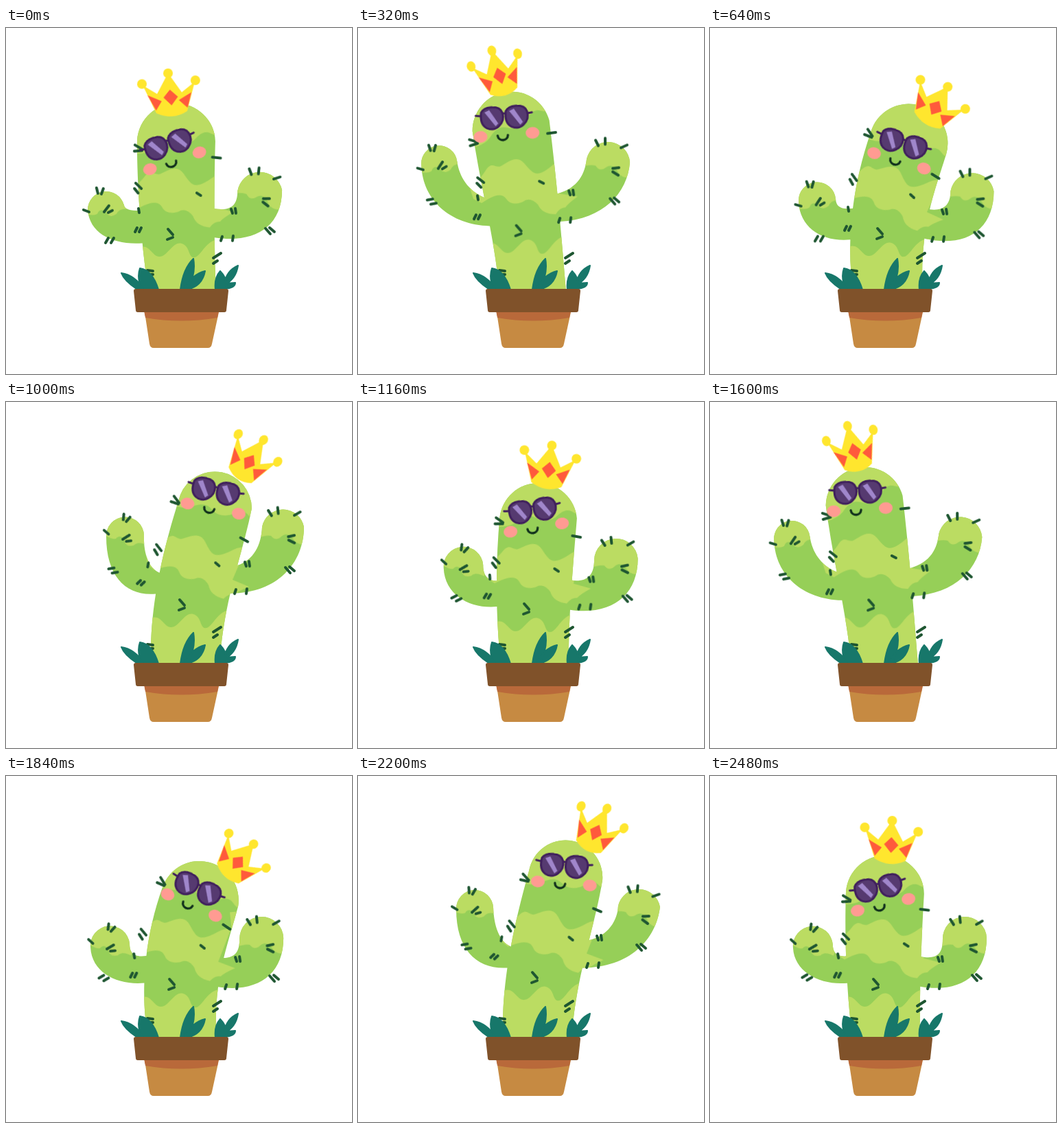
Recreate the animation shown at these times as an HTML page without scripts. Size 504 px wide and 504 px high, loop 2.52 s.

```html
<!DOCTYPE html>
<html lang="en">
<head>
<meta charset="utf-8">
<title>Dancing cactus</title>
<style>
html, body { margin: 0; width: 100%; height: 100%; overflow: hidden; background: #fff; }
svg { display: block; width: 100%; height: 100%; }
.move { animation: 1260ms linear infinite; }
.body { animation-name: body; }
.armL { animation-name: armL; }
.armR { animation-name: armR; }
.face { animation-name: face; }
.head { animation-name: head; }
.crown { animation-name: crown; }
.chest { animation-name: chest; }
.belly { animation-name: belly; }
.handL { animation-name: handL; }
.elbowL { animation-name: elbowL; }
.shoulderL { animation-name: shoulderL; }
.handR { animation-name: handR; }
.elbowR { animation-name: elbowR; }
.shoulderR { animation-name: shoulderR; }
.light { fill: #bbdc62; }
.spikes { fill: none; stroke: #1e5631; stroke-width: 4; stroke-linecap: round; }

/* Outlines */
@keyframes body {
  0%, 100% { d: path("M208 385C197 320 191 230 191 169A57 57 0 0 1 305 165C303 230 303 320 306 385Z"); }
  7.94% { d: path("M208 385C200 320 187 235 182 163A57 57 0 0 1 296 157C300 230 299 310 305 385Z"); animation-timing-function: ease-out; }
  23.81% { d: path("M206 385C200 310 178 230 166 150A57 57 0 0 1 278 134C290 230 296 300 303 385Z"); animation-timing-function: ease-in-out; }
  46.03% { d: path("M208 385C196 330 198 245 228 162A57 57 0 0 1 338 190C324 244 300 300 307 385Z"); }
  50.79% { d: path("M209 385C198 320 205 235 234 152A57 57 0 0 1 344 184C329 233 304 292 310 385Z"); animation-timing-function: ease-out; }
  63.49% { d: path("M210 385C207 310 220 240 246 142A54 54 0 0 1 353 157C342 230 316 290 310 385Z"); }
  74.6% { d: path("M211 385C209 310 221 238 249 138A54 54 0 0 1 356 152C344 226 317 290 311 385Z"); }
  79.37% { d: path("M211 385C209 310 222 235 254 135A54 54 0 0 1 358 155C344 225 316 290 311 385Z"); animation-timing-function: ease-in-out; }
  96.83% { d: path("M208 385C199 320 196 240 198 174A57 57 0 0 1 312 172C308 240 305 310 306 385Z"); }
}
@keyframes armL {
  0%, 100% { d: path("M205 265C180 268 173 264 172 258A27 27 0 0 0 119 265C122 302 160 318 205 313Z"); }
  7.94% { d: path("M200 260C176 264 164 256 163 240A26 26 0 0 0 111 251C118 290 150 312 200 302Z"); animation-timing-function: ease-out; }
  23.81% { d: path("M205 252C168 248 148 222 144 194A26 26 0 0 0 92 200C94 254 140 292 205 288Z"); animation-timing-function: ease-in-out; }
  46.03% { d: path("M205 262C184 265 180 256 180 244A28 28 0 0 0 123 250C125 288 165 306 205 301Z"); }
  50.79% { d: path("M215 262C192 266 184 262 183 250A27 27 0 0 0 129 254C131 295 170 316 215 307Z"); animation-timing-function: ease-out; }
  63.49% { d: path("M227 250C207 246 194 225 191 203A27 27 0 0 0 138 208C139 264 176 288 225 282Z"); }
  74.6% { d: path("M228 250C207 246 198 220 197 192A27 27 0 0 0 143 194C143 256 176 284 222 279Z"); }
  79.37% { d: path("M228 250C208 246 200 220 201 194A27 27 0 0 0 146 196C146 257 178 285 222 279Z"); animation-timing-function: ease-in-out; }
  96.83% { d: path("M203 262C184 265 179 256 179 245A28 28 0 0 0 121 250C123 288 165 306 203 301Z"); }
}
@keyframes armR {
  0%, 100% { d: path("M296 262C325 268 337 262 337 238A33 33 0 0 1 402 236C402 295 355 316 296 304Z"); }
  7.94% { d: path("M292 246C330 248 345 222 356 208A34 34 0 0 1 412 244C395 275 350 292 294 288Z"); animation-timing-function: ease-out; }
  23.81% { d: path("M270 245C318 240 330 215 333 190A32 32 0 0 1 396 195C392 245 350 285 275 282Z"); animation-timing-function: ease-in-out; }
  46.03% { d: path("M302 264C328 268 340 262 340 238A32 32 0 0 1 404 236C404 292 362 318 302 306Z"); }
  50.79% { d: path("M308 262C336 270 350 262 350 238A32 32 0 0 1 413 238C413 296 370 322 308 306Z"); animation-timing-function: ease-out; }
  63.49% { d: path("M318 244C362 246 382 218 387 196A33 33 0 0 1 451 210C440 262 392 294 312 284Z"); }
  74.6% { d: path("M318 241C359 242 378 214 379 190A31 31 0 0 1 440 191C434 242 390 285 312 279Z"); }
  79.37% { d: path("M318 240C354 242 372 214 373 182A31 31 0 0 1 434 182C434 238 390 285 312 278Z"); animation-timing-function: ease-in-out; }
  96.83% { d: path("M302 262C328 268 339 262 339 238A32 32 0 0 1 403 236C403 292 362 318 302 306Z"); }
}

/* Parts carried by the outlines */
@keyframes face {
  0%, 100% { transform: translate(236px, 170px) rotate(-18deg); }
  7.94% { transform: translate(228px, 158px) rotate(-18deg); animation-timing-function: ease-out; }
  23.81% { transform: translate(212px, 130px) rotate(-4deg); animation-timing-function: ease-in-out; }
  46.03% { transform: translate(279px, 164px) rotate(25deg); }
  50.79% { transform: translate(281px, 169px) rotate(18deg); animation-timing-function: ease-out; }
  63.49% { transform: translate(299px, 138px) rotate(5deg); }
  74.6% { transform: translate(300px, 131px) rotate(5deg); }
  79.37% { transform: translate(305px, 130px) rotate(12deg); animation-timing-function: ease-in-out; }
  96.83% { transform: translate(245px, 163px) rotate(-12deg); }
}
@keyframes head {
  0%, 100% { transform: translate(250px, 183px) rotate(6deg); }
  7.94% { transform: translate(240px, 178px) rotate(1deg); animation-timing-function: ease-out; }
  23.81% { transform: translate(225px, 160px) rotate(-8deg); animation-timing-function: ease-in-out; }
  46.03% { transform: translate(274px, 188px) rotate(34deg); }
  50.79% { transform: translate(280px, 186px) rotate(32deg); animation-timing-function: ease-out; }
  63.49% { transform: translate(292px, 176px) rotate(24deg); }
  74.6% { transform: translate(296px, 173px) rotate(23deg); }
  79.37% { transform: translate(297px, 173px) rotate(29deg); animation-timing-function: ease-in-out; }
  96.83% { transform: translate(256px, 188px) rotate(7deg); }
}
@keyframes crown {
  0%, 100% { transform: translate(237px, 79px) rotate(-4deg) scale(1); }
  7.94% { transform: translate(228px, 66px) rotate(-4deg) scale(1); animation-timing-function: ease-out; }
  23.81% { transform: translate(197px, 46px) rotate(-16deg) scale(.9, 1.08); animation-timing-function: ease-in-out; }
  46.03% { transform: translate(352px, 109px) rotate(43deg) scale(.95, 1); }
  50.79% { transform: translate(339px, 97px) rotate(33deg) scale(1); animation-timing-function: ease-out; }
  63.49% { transform: translate(356px, 66px) rotate(28deg) scale(.9, 1.08); }
  74.6% { transform: translate(356px, 60px) rotate(27deg) scale(.9, 1.08); }
  79.37% { transform: translate(367px, 67px) rotate(35deg) scale(.9, 1.08); animation-timing-function: ease-in-out; }
  96.83% { transform: translate(265px, 78px) rotate(5deg) scale(1); }
}
@keyframes chest {
  0%, 100% { transform: translate(236px, 238px) rotate(6deg); }
  7.94% { transform: translate(231px, 231px) rotate(5deg); animation-timing-function: ease-out; }
  23.81% { transform: translate(222px, 225px); animation-timing-function: ease-in-out; }
  46.03% { transform: translate(242px, 240px) rotate(12deg); }
  50.79% { transform: translate(251px, 233px) rotate(16deg); animation-timing-function: ease-out; }
  63.49% { transform: translate(264px, 230px) rotate(13deg); }
  74.6% { transform: translate(266px, 228px) rotate(12deg); }
  79.37% { transform: translate(264px, 226px) rotate(14deg); animation-timing-function: ease-in-out; }
  96.83% { transform: translate(241px, 242px) rotate(6deg); }
}
@keyframes belly {
  0%, 100% { transform: translate(239px, 300px); }
  7.94% { transform: translate(236px, 296px); }
  23.81% { transform: translate(233px, 294px); }
  46.03% { transform: translate(241px, 303px); }
  50.79% { transform: translate(247px, 299px); }
  63.49% { transform: translate(255px, 294px); }
  74.6% { transform: translate(257px, 293px); }
  79.37% { transform: translate(256px, 295px); }
  96.83% { transform: translate(241px, 303px); }
}
@keyframes handL {
  0%, 100% { transform: translate(145px, 262px); }
  7.94% { transform: translate(137px, 245px) rotate(-15deg); animation-timing-function: ease-out; }
  23.81% { transform: translate(118px, 198px) rotate(-5deg); animation-timing-function: ease-in-out; }
  46.03% { transform: translate(151px, 247px) rotate(22deg); }
  50.79% { transform: translate(156px, 252px) rotate(-5deg); animation-timing-function: ease-out; }
  63.49% { transform: translate(165px, 206px) rotate(10deg); }
  74.6% { transform: translate(169px, 193px) rotate(10deg); }
  79.37% { transform: translate(174px, 195px) rotate(20deg); animation-timing-function: ease-in-out; }
  96.83% { transform: translate(149px, 247px) rotate(22deg); }
}
@keyframes elbowL {
  0%, 100% { transform: translate(150px, 310px); }
  7.94% { transform: translate(148px, 303px); animation-timing-function: ease-out; }
  23.81% { transform: translate(106px, 252px) rotate(50deg); animation-timing-function: ease-in-out; }
  46.03% { transform: translate(141px, 294px) rotate(30deg); }
  50.79% { transform: translate(158px, 308px); animation-timing-function: ease-out; }
  63.49% { transform: translate(152px, 262px) rotate(40deg); }
  74.6% { transform: translate(157px, 248px) rotate(50deg); }
  79.37% { transform: translate(155px, 245px) rotate(50deg); animation-timing-function: ease-in-out; }
  96.83% { transform: translate(140px, 293px) rotate(30deg); }
}
@keyframes shoulderL {
  0%, 100% { transform: translate(192px, 294px) rotate(0deg); }
  7.94% { transform: translate(188px, 288px) rotate(0deg); }
  23.81% { transform: translate(172px, 274px) rotate(0deg); }
  46.03% { transform: translate(185px, 290px) rotate(0deg); }
  50.79% { transform: translate(200px, 292px) rotate(0deg); }
  63.49% { transform: translate(200px, 270px) rotate(15deg); }
  74.6% { transform: translate(198px, 263px) rotate(20deg); }
  79.37% { transform: translate(196px, 263px) rotate(20deg); }
  96.83% { transform: translate(185px, 290px) rotate(0deg); }
}
@keyframes handR {
  0%, 100% { transform: translate(369px, 236px) rotate(6deg); }
  7.94% { transform: translate(384px, 224px) rotate(25deg); animation-timing-function: ease-out; }
  23.81% { transform: translate(364px, 192px); animation-timing-function: ease-in-out; }
  46.03% { transform: translate(372px, 236px) rotate(-6deg); }
  50.79% { transform: translate(382px, 238px); animation-timing-function: ease-out; }
  63.49% { transform: translate(418px, 205px) rotate(10deg); }
  74.6% { transform: translate(409px, 192px) rotate(5deg); }
  79.37% { transform: translate(403px, 185px) rotate(-6deg); animation-timing-function: ease-in-out; }
  96.83% { transform: translate(371px, 236px) rotate(-6deg); }
}
@keyframes elbowR {
  0%, 100% { transform: translate(384px, 296px); }
  7.94% { transform: translate(377px, 280px); animation-timing-function: ease-out; }
  23.81% { transform: translate(373px, 252px); animation-timing-function: ease-in-out; }
  46.03% { transform: translate(390px, 295px); }
  50.79% { transform: translate(391px, 302px); animation-timing-function: ease-out; }
  63.49% { transform: translate(419px, 263px); }
  74.6% { transform: translate(412px, 250px); }
  79.37% { transform: translate(413px, 245px); animation-timing-function: ease-in-out; }
  96.83% { transform: translate(388px, 294px); }
}
@keyframes shoulderR {
  0%, 100% { transform: translate(331px, 267px); }
  7.94% { transform: translate(322px, 244px); }
  23.81% { transform: translate(308px, 238px); }
  46.03% { transform: translate(337px, 267px); }
  50.79% { transform: translate(341px, 268px); }
  63.49% { transform: translate(350px, 241px); }
  74.6% { transform: translate(351px, 236px); }
  79.37% { transform: translate(351px, 236px); }
  96.83% { transform: translate(335px, 267px); }
}
</style>
</head>
<body>
<svg viewBox="0 0 504 504">
  <defs>
    <clipPath id="cactus">
      <path class="move body"/>
      <path class="move armL"/>
      <path class="move armR"/>
    </clipPath>
    <g id="lens">
      <path d="M-15-9Q-10-17 2-16Q13-16 16-7Q19 4 10 12Q2 19-8 14Q-18 8-15-9Z" fill="#563a70" stroke="#3f1f5c" stroke-width="3"/>
      <path d="M-10-9L-3-12L9 8L5 12Z" fill="#a086cb"/>
    </g>
  </defs>

  <g clip-path="url(#cactus)">
    <rect width="504" height="504" fill="#96cf58"/>
    <g class="light">
      <path class="move head" d="M-80-90H75V-42Q58-28 46-34T22-22Q8-10-6-16T-34-4Q-46 8-80 8Z"/>
      <path class="move chest" d="M-62 0C-50 0-45-4-36-18S-22-20-14-24S8-42 20-28S36-10 48-16S66-34 80-34L72 16L98 20Q84 30 80 36Q72 36 66 46Q46 46 40 32Q28 20 18 28S2 36-6 24S-30 22-42 30L-54 24Z"/>
      <path class="move belly" d="M-50 22C-30 10-28 32-16 33S4 10 17 14S26 36 36 34S52 8 72 8V100H-50Z"/>
      <path class="move handL" d="M-34-34H34V2Q20 0 16 9Q6 16 0 6Q-8 0-12 9Q-20 13-34 7Z"/>
      <path class="move handR" d="M-42-42H42V22Q26 30 16 20Q8 4-2 10Q-12 18-18 8Q-26 6-42 10Z"/>
    </g>
  </g>

  <g class="spikes">
    <path d="M302 335L313 328M302 343L308 339M206 353L214 354M208 359H214"/>
    <path class="move head" d="M-63-6L-52-1M-63 3L-52 1M51 0H63"/>
    <path class="move chest" d="M-48-7L-39 0M-49 1L-43 7M42-2L48 1"/>
    <path class="move belly" d="M-3-7L4 1M4 5L-4 8"/>
    <path class="move handL" d="M-32 3L-24 6M-13-29L-11-21M-3-28L-6-20M5-3L-2 6M4 7L10 4"/>
    <path class="move elbowL" d="M-5 3L-1-4M3 3L7-4"/>
    <path class="move shoulderL" d="M-4 3L-1-3M2 3L5-3M1-31L2-25"/>
    <path class="move handR" d="M-18-29L-14-21M-4-32L-4-23M19-18L28-22M7 12L16 11M7 17L15 22"/>
    <path class="move elbowR" d="M-6-4L1 4M0-5L7 1"/>
    <path class="move shoulderR" d="M-3-3L-1 3M3-4L4 3M-16 37L-18 43M0 36L-1 43"/>
  </g>

  <g class="move face">
    <g fill="#ff9b92">
      <ellipse cx="-36" cy="26" rx="10" ry="8.5"/>
      <ellipse cx="40" cy="25" rx="10" ry="8.5"/>
    </g>
    <path d="M-11 26C-10 35 3 35 4 26" fill="none" stroke="#10301c" stroke-width="3.3" stroke-linecap="round"/>
    <path d="M-41-5L-34-4M-5-4Q0-8 5-4M34-4L41-5" fill="none" stroke="#3f1f5c" stroke-width="3" stroke-linecap="round"/>
    <use href="#lens" x="-18"/>
    <use href="#lens" x="18"/>
  </g>

  <g class="move crown">
    <g fill="#ffe62e">
      <path d="M-38 2L-18 16L-2-10H2L18 16L38 2L24 44Q2 56-21 44Z"/>
      <circle cx="-39" r="7"/>
      <circle cy="-13" r="7"/>
      <circle cx="39" r="7"/>
    </g>
    <path d="M-32 17L-12 27L-21 40ZM32 17L13 27L25 39ZM1 11L12 22L2 34L-9 22Z" fill="#ff5a3c"/>
  </g>

  <path fill="#17776a" stroke="#17776a" stroke-width="2" stroke-linejoin="round" d="M168 357Q188 360 200 380H190Q172 368 168 357ZM195 350Q213 352 222 381H198Q190 364 195 350ZM273 336Q277 358 265 381H254Q258 350 273 336ZM290 354Q286 376 264 381H258Q272 358 290 354ZM312 354Q324 366 321 381H305Q303 364 312 354ZM338 346Q335 366 318 374Q320 354 338 346ZM334 371Q334 379 318 380L320 372Z"/>
  <path fill="#c68a42" d="M202 414H310L300 460Q299 466 294 466H215Q210 466 209 460Z"/>
  <path fill="#b9693a" d="M201 412H310L308 422Q255 431 203 422Z"/>
  <path fill="#80522a" d="M186 383q0-3 3-3h132q3 0 3 3l-3 28q0 3-3 3H192q-3 0-3-3z"/>
</svg>
</body>
</html>
```
